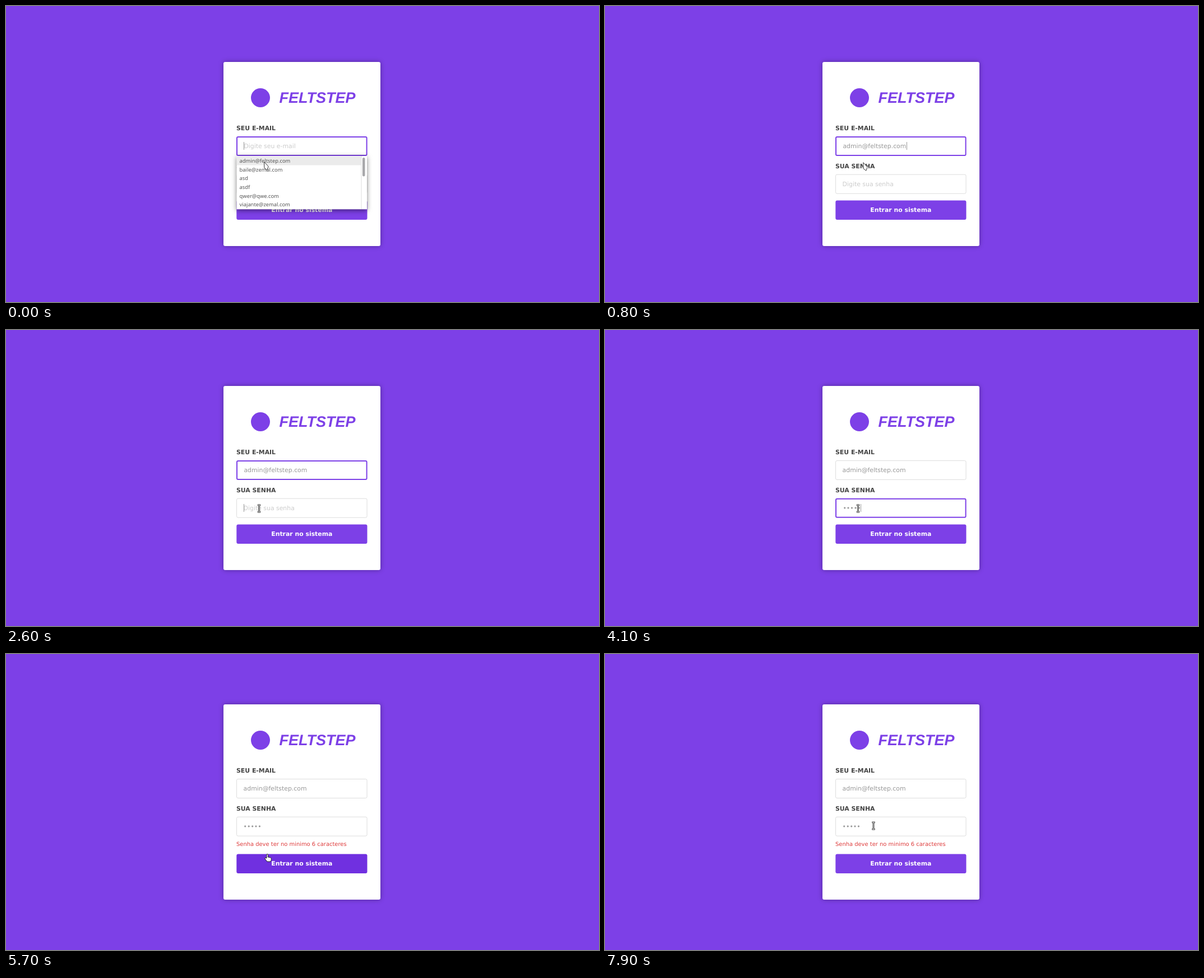
An HTML page that plays this animation: 1058 by 529 pixels, repeating every 8 s.

```html
<!DOCTYPE html>
<html lang="pt-BR">
<head>
<meta charset="utf-8">
<title>Login</title>
<style>
  html, body { margin: 0; width: 100%; height: 100%; overflow: hidden; background: #7d40e7; }
  svg { display: block; width: 1058px; height: 529px; }
  text { font: 10.89px "DejaVu Sans", sans-serif; text-rendering: geometricPrecision; white-space: pre; }
  .label { font-weight: bold; fill: #444; }
  .value { fill: #999; }
  .value.hint { fill: #ccc; }
  .action { font-weight: bold; fill: #fff; text-anchor: middle; }
  .error { font-size: 9.94px; fill: #de3b3b; }
  .brand { font: italic bold 27px "Liberation Sans", Arial, sans-serif; fill: #7d40e7; }
  .option { font: 9.33px "Noto Sans", sans-serif; fill: #555; }
  #card { filter: drop-shadow(0 0 4px rgba(0, 0, 0, .35)); }
  #menuBox { filter: drop-shadow(0 2px 4px rgba(0, 0, 0, .5)); }
</style>
</head>
<body>
<svg viewBox="0 0 1058 529">
  <rect width="1058" height="529" fill="#7d40e7"/>
  <rect id="card" x="388" y="100" width="280" height="329" rx="3" fill="#fff"/>
  <g id="form">
    <circle cx="454" cy="164" r="17" fill="#7d40e7"/>
    <text class="brand" x="487.5" y="172.8">FELTSTEP</text>
    <text class="label" x="411" y="222">SEU E-MAIL</text>
    <rect id="emailBox" fill="#fff"/>
    <text id="emailText" y="254"/>
    <text class="label" x="411" y="290">SUA SENHA</text>
    <rect id="passBox" fill="#fff"/>
    <text id="passText" y="321.8"/>
    <text id="error" class="error" x="411" y="353">Senha deve ter no minimo 6 caracteres</text>
    <rect id="caret" width="1" height="14" fill="#999"/>
  </g>
  <g id="button">
    <rect id="buttonBox" x="411.3" y="347.5" width="233.2" height="34.5" rx="3"/>
    <text class="action" x="527.8" y="368.2">Entrar no sistema</text>
  </g>
  <g id="menu">
    <rect id="menuBox" x="411.5" y="268" width="232.5" height="95.3" fill="#fff"/>
    <rect x="412" y="269" width="221.5" height="15.5" fill="#ebebeb"/>
    <rect x="633.5" y="268" width="1" height="95" fill="#ddd"/>
    <rect x="636" y="271" width="4.5" height="33.5" rx="2.2" fill="#a8a8ab"/>
  </g>
  <g id="arrow" fill="#fff" stroke="#333" stroke-linejoin="round">
    <path d="M.8 .8V11.3L5.8 15.3L8.2 8.8Z"/>
  </g>
  <g id="beam" fill="none">
    <path d="M-2.6-6.2H2.6M-2.6 6.2H2.6M0-6V6" stroke="#2b2b2b" stroke-width="2.8"/>
    <path d="M-2-6.2H2M-2 6.2H2M0-6V6" stroke="#fff" stroke-width=".9"/>
  </g>
  <g id="hand" fill="#fff" stroke="#222" stroke-linejoin="round">
    <path d="M4 8V2Q4 .5 5.2 .5T6.4 2V6L10.8 6.8Q12.2 7.1 12.2 8.6V11.5L11 14H5L1 9Q.2 7.6 1.6 7.2Z"/>
  </g>
</svg>
<script>
const LOOP = 8000;
const ACCENT = "#7d40e7";
const EMAIL = "admin@feltstep.com";
const OPTIONS = [EMAIL, "baile@zemal.com", "asd", "asdf", "qwer@qwe.com", "viajante@zemal.com"];
const BULLET_WIDTH = 6.42;

// [time, cursor kind, x, y]
const CURSOR = [
  [0, "arrow", 460, 278], [400, "arrow", 460, 279],
  [1200, "arrow", 461, 275], [1300, "arrow", 463, 270],
  [1400, "beam", 468, 268], [1500, "beam", 469, 267.5],
  [1700, "arrow", 466, 272], [1800, "arrow", 463, 280], [1900, "arrow", 459, 289],
  [2000, "beam", 454, 305], [2100, "beam", 452, 314], [2200, "beam", 451.5, 319],
  [4800, "arrow", 461, 346], [5000, "hand", 461, 357],
  [5900, "arrow", 536, 271], [6200, "arrow", 536, 270.5],
  [6900, "beam", 507.5, 295.5], [7200, "beam", 484, 305],
  [7400, "beam", 479.5, 305], [7700, "beam", 479.3, 306.5], [7900, "beam", 479, 307]
];
const MENU_OPACITY = [[0, 1], [600, .6], [700, .25], [800, 0]];
const CARET = [[0, 424, 243], [600, 538, 243], [1700], [2600, 424, 311], [3100, "typed", 311], [5000]];
const TYPED = [[0, 0], [3100, 1], [3300, 2], [3500, 3], [3700, 4], [4100, 5]];
const BUTTON_FILL = [[0, ACCENT], [5000, "#7536e2"], [5400, "#7030e0"], [5900, ACCENT]];

const $ = id => document.getElementById(id);
const at = (track, t) => track.findLast(step => step[0] <= t);
const move = (id, x, y) => $(id).setAttribute("transform", `translate(${x} ${y})`);
const show = (id, visible) => $(id).setAttribute("visibility", visible ? "visible" : "hidden");

function set(id, attrs) {
  for (const name in attrs) $(id).setAttribute(name, attrs[name]);
}

function drawField(name, top, focused, value, hint) {
  const line = focused ? 2 : 1;
  set(name + "Box", {
    x: 411 + line / 2, y: top + line / 2, width: 233.6 - line, height: 35 - line,
    rx: 3 - line / 2, stroke: focused ? ACCENT : "#ddd", "stroke-width": line
  });
  set(name + "Text", { x: focused ? 424.4 : 423.6, class: value ? "value" : "value hint" });
  $(name + "Text").textContent = value || hint;
}

function render(t) {
  const invalid = t >= 5700;
  const typed = at(TYPED, t)[1];

  set("card", { y: invalid ? 90 : 100, height: invalid ? 349 : 329 });
  move("form", 0, invalid ? -10 : 0);
  move("button", 0, invalid ? 10 : 0);
  show("error", invalid);

  drawField("email", 233, t < 3100, t >= 600 ? EMAIL : "", "Digite seu e-mail");
  drawField("pass", 300.7, t >= 3100 && !invalid, "•".repeat(typed), "Digite sua senha");
  set("buttonBox", { fill: at(BUTTON_FILL, t)[1] });

  const [, caretX, caretY] = at(CARET, t);
  show("caret", caretX);
  if (caretX) set("caret", { x: caretX === "typed" ? Math.round(424.4 + typed * BULLET_WIDTH - .5) : caretX, y: caretY });

  set("menu", { opacity: at(MENU_OPACITY, t)[1] });

  const [, kind, x, y] = at(CURSOR, t);
  for (const id of ["arrow", "beam", "hand"]) show(id, id === kind);
  move(kind, x, y);
}

OPTIONS.forEach((label, i) => {
  const option = document.createElementNS("http://www.w3.org/2000/svg", "text");
  option.setAttribute("class", "option");
  option.setAttribute("x", 416.6);
  option.setAttribute("y", 280.3 + i * 15.55);
  option.textContent = label;
  $("menu").append(option);
});

function tick() {
  render(performance.now() % LOOP);
  requestAnimationFrame(tick);
}
tick();
</script>
</body>
</html>
```
